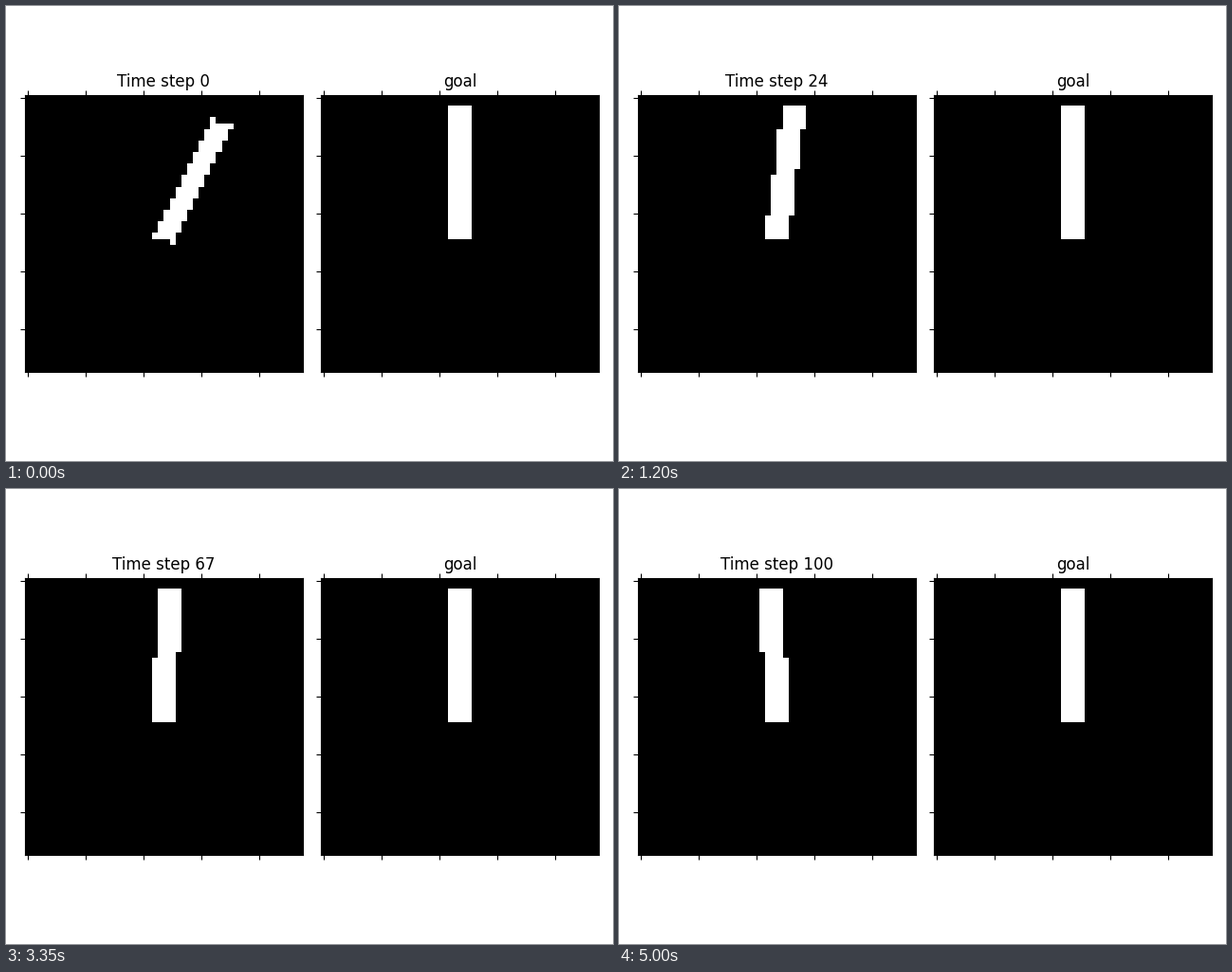
Recreate the animation shown at these times as a matplotlib script. Size 640 px wide and 480 px high, loop 5.05 s.

```python
import math

import numpy as np
import matplotlib.pyplot as plt
from matplotlib.animation import FuncAnimation

W, H, DPI = 640, 480, 100
GRID = 48
PIVOT = (22, 24)          # lower left corner of the rod, in cells
ROD_LEN, ROD_WIDTH = 22, 3
STEPS = 101

# Turning points of the swing: (step, degrees to the right of upright)
SWING = [(0, 26.6), (12, -20.9), (25, 9.4), (37, -5.0), (47, 3.0), (57, -5.2),
         (69, 3.0), (81, -3.0), (92, 4.8), (99, -2.3), (100, -2.3)]


def angle_at(step):
    """Ease along a half cosine between neighbouring turning points."""
    for (s0, a0), (s1, a1) in zip(SWING, SWING[1:]):
        if step <= s1:
            t = (step - s0) / (s1 - s0)
            return a0 + (a1 - a0) * (1 - math.cos(math.pi * t)) / 2
    return SWING[-1][1]


def rod_corners(degrees):
    a = math.radians(degrees)
    s, c = math.sin(a), math.cos(a)
    x, y = PIVOT
    up = (round(ROD_LEN * s), -round(ROD_LEN * c))
    side = (round(ROD_WIDTH * c), round(ROD_WIDTH * s))
    return [(x, y),
            (x + up[0], y + up[1]),
            (x + up[0] + side[0], y + up[1] + side[1]),
            (x + side[0], y + side[1])]


def row_crossings(corners, row):
    xs = []
    for (x0, y0), (x1, y1) in zip(corners, corners[1:] + corners[:1]):
        if y0 == y1:
            if y0 == row:
                xs += [x0, x1]
        elif min(y0, y1) <= row <= max(y0, y1):
            xs.append(x0 + (x1 - x0) * (row - y0) / (y1 - y0))
    return xs


def render(degrees):
    image = np.zeros((GRID, GRID))
    corners = rod_corners(degrees)
    for row in range(GRID):
        xs = row_crossings(corners, row)
        if xs:
            left = math.floor(min(xs) + 0.5)
            right = math.ceil(max(xs) - 0.5)
            image[row, left:right + 1] = 1
    return image


fig = plt.figure(figsize=(W / DPI, H / DPI), dpi=DPI, facecolor="white")

# Panel geometry in pixels: equal outer pads and gap, ticks on the left
PAD = 15
TICK = 3.5 * DPI / 72
SIDE = (W - 3 * PAD - 2 * TICK) / 2


def add_panel(left, title, image):
    ax = fig.add_axes([left / W, (H - SIDE) / 2 / H, SIDE / W, SIDE / H])
    art = ax.imshow(image, cmap="gray", vmin=0, vmax=1,
                    interpolation="nearest", aspect="auto")
    ticks = range(0, GRID, 10)
    ax.set_xticks(ticks)
    ax.set_yticks(ticks)
    ax.tick_params(top=True, bottom=True, left=True, right=False,
                   labelbottom=False, labelleft=False)
    label = ax.set_title(title, fontsize=12, y=1.0, pad=6)
    return art, label


rod, caption = add_panel(PAD + TICK, "Time step 0", render(angle_at(0)))
add_panel(W - PAD - SIDE, "goal", render(0))


def update(step):
    rod.set_data(render(angle_at(step)))
    caption.set_text(f"Time step {step}")
    return rod, caption


anim = FuncAnimation(fig, update, frames=STEPS, interval=50,
                     repeat=True, repeat_delay=0, blit=False)
plt.show()
```
